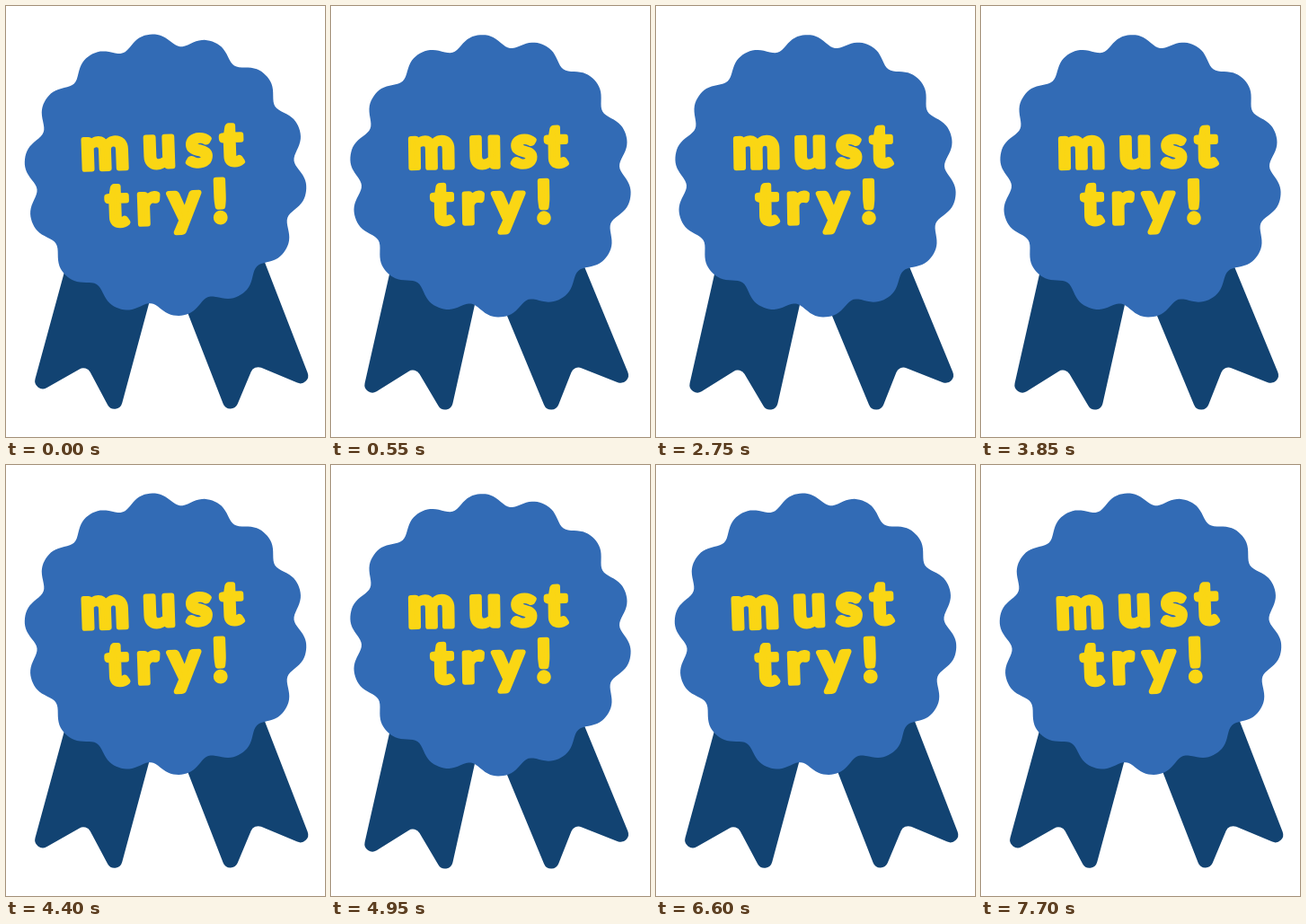
Write an HTML page that moves like this. It is 355 px wide and 480 px high and loops after 8000 ms.

```html
<!DOCTYPE html>
<html lang="en">
<head>
<meta charset="utf-8">
<title>must try!</title>
<style>
  html, body { margin: 0; width: 100%; height: 100%; overflow: hidden; background: #fff; }
  svg { display: block; width: 100%; height: 100%; }
  .ribbon { fill: #124372; }
  #badge { fill: #326bb5; }
  text {
    font: bold 64px Lato, sans-serif;
    text-anchor: middle;
    fill: #fad614;
    stroke: #fad614;
    stroke-width: 6;
    stroke-linejoin: round;
  }
</style>
</head>
<body>
<svg viewBox="0 0 355 480">
  <path id="left" class="ribbon"/>
  <path id="right" class="ribbon"/>
  <path id="badge"/>
  <g id="label">
    <text x="111 171.8 215.7 252" y="178.7">must</text>
    <text x="122.4 156 197.2 237.3" y="242">try!</text>
  </g>
</svg>
<script>
const STEP = 550, LOOP = 8000;
const $ = id => document.getElementById(id);

// Closed polygon with every corner replaced by an arc of radius r.
function rounded(points, r) {
  const n = points.length;
  return points.map(([x, y], i) => {
    const [ax, ay] = points[(i + n - 1) % n];
    const [bx, by] = points[(i + 1) % n];
    const la = Math.hypot(ax - x, ay - y), lb = Math.hypot(bx - x, by - y);
    const ux = (ax - x) / la, uy = (ay - y) / la;
    const vx = (bx - x) / lb, vy = (by - y) / lb;
    const d = r / Math.tan(Math.acos(ux * vx + uy * vy) / 2);
    const sweep = ux * vy - uy * vx < 0 ? 1 : 0;
    return `${i ? 'L' : 'M'}${x + ux * d} ${y + uy * d}A${r} ${r} 0 0 ${sweep} ${x + vx * d} ${y + vy * d}`;
  }).join('') + 'Z';
}

// Wavy disc centred on the origin, one lobe pointing up; the second harmonic fattens the lobes.
function scallop(lobes, radius, depth) {
  const count = lobes * 24;
  const points = Array.from({ length: count }, (_, i) => {
    const a = i / count * 2 * Math.PI;
    const r = radius + depth * (Math.cos(lobes * a) - 0.15 * Math.cos(2 * lobes * a));
    return `${(r * Math.sin(a)).toFixed(2)} ${(-r * Math.cos(a)).toFixed(2)}`;
  });
  return 'M' + points.join('L') + 'Z';
}

$('left').setAttribute('d', rounded([[77.5, 250], [27, 435.5], [89.5, 400], [123.5, 463.5], [181, 250]], 8.7));
$('right').setAttribute('d', rounded([[158.6, 230], [249.5, 463], [276, 399.5], [343, 427.5], [266.5, 230]], 8.7));
$('badge').setAttribute('d', scallop(14, 151.7, 6.8));

const poses = [
  {
    left: '',
    right: '',
    badge: 'translate(177.5 188.2) rotate(-6.4)',
    label: 'translate(176 190) rotate(-2) translate(-176 -190)'
  },
  {
    left: 'rotate(-2.5 141 300)',
    right: 'rotate(-1.2 299 662)',
    badge: 'translate(177.5 189.3) rotate(-4.2)',
    label: 'translate(176 190) rotate(-.9) scale(.985) translate(-176 -190)'
  }
];

function draw(time) {
  const pose = poses[Math.floor(time % LOOP / STEP) % 2];
  for (const id in pose) $(id).setAttribute('transform', pose[id]);
}

function tick() {
  draw(performance.now());
  requestAnimationFrame(tick);
}
tick();
</script>
</body>
</html>
```
